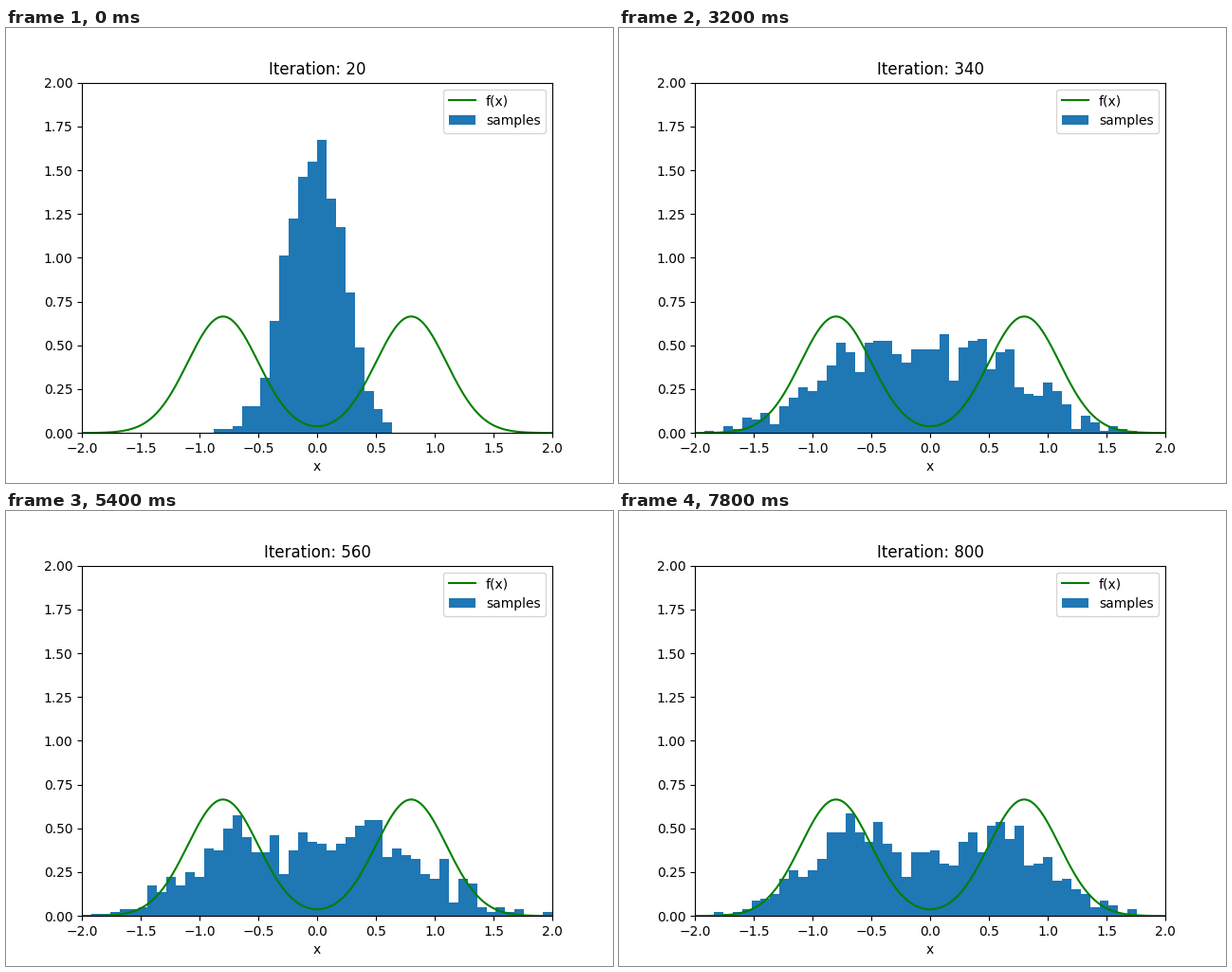
These frames come from a looping animation (640 by 480 pixels, 8 s). A matplotlib script:

```python
import numpy as np
import matplotlib.pyplot as plt
from matplotlib.animation import FuncAnimation

FRAMES, INTERVAL = 40, 200
STEP = 20                      # iterations per frame
SAMPLES, BINS = 1000, 50
EDGES = np.linspace(-2, 2, BINS + 1)
WIDTH = 4 / BINS
MEMORY = 0.91                  # how much of its place a sample keeps per frame


def target(x):
    """Equal mixture of two normals at -0.8 and 0.8."""
    s = 0.3
    bells = np.exp(-((x - 0.8) / s) ** 2 / 2) + np.exp(-((x + 0.8) / s) ** 2 / 2)
    return bells / (2 * s * np.sqrt(2 * np.pi))


def random_walks():
    """Steady unit-normal walk of every sample, one row per frame."""
    rng = np.random.default_rng(4)
    z = rng.standard_normal(SAMPLES)
    rows = []
    for _ in range(FRAMES):
        rows.append(z)
        z = MEMORY * z + np.sqrt(1 - MEMORY ** 2) * rng.standard_normal(SAMPLES)
    return rows


WALKS = random_walks()
SIDES = np.where(np.arange(SAMPLES) % 2, 1, -1)


def cloud(i, n):
    """The cloud diffuses from the centre and slowly splits in two."""
    split = 0.62 * (1 - np.exp(-n / 233))
    variance = 0.56 * (1 - np.exp(-n / 190))
    drift = -0.0012 * n * np.exp(-n / 200)
    spread = np.sqrt(variance - split ** 2)
    return drift + split * SIDES + spread * WALKS[i]


fig, ax = plt.subplots(figsize=(6.4, 4.8), dpi=100)
xs = np.linspace(-2, 2, 500)
curve, = ax.plot(xs, target(xs), color="green", label="f(x)")
bars = ax.bar(EDGES[:-1], np.zeros(BINS), WIDTH, align="edge",
              color="C0", label="samples")
ax.set_xlim(-2, 2)
ax.set_ylim(0, 2)
ax.set_xlabel("x")
ax.legend(handles=[curve, bars], loc="upper right")
title = ax.set_title("")


def update(i):
    n = STEP * (i + 1)
    counts, _ = np.histogram(cloud(i, n), EDGES)
    for bar, c in zip(bars, counts):
        bar.set_height(c / (SAMPLES * WIDTH))
    title.set_text(f"Iteration: {n}")
    return [*bars, title]


anim = FuncAnimation(fig, update, frames=FRAMES, interval=INTERVAL,
                     repeat=True, repeat_delay=0, blit=False)
plt.show()
```
